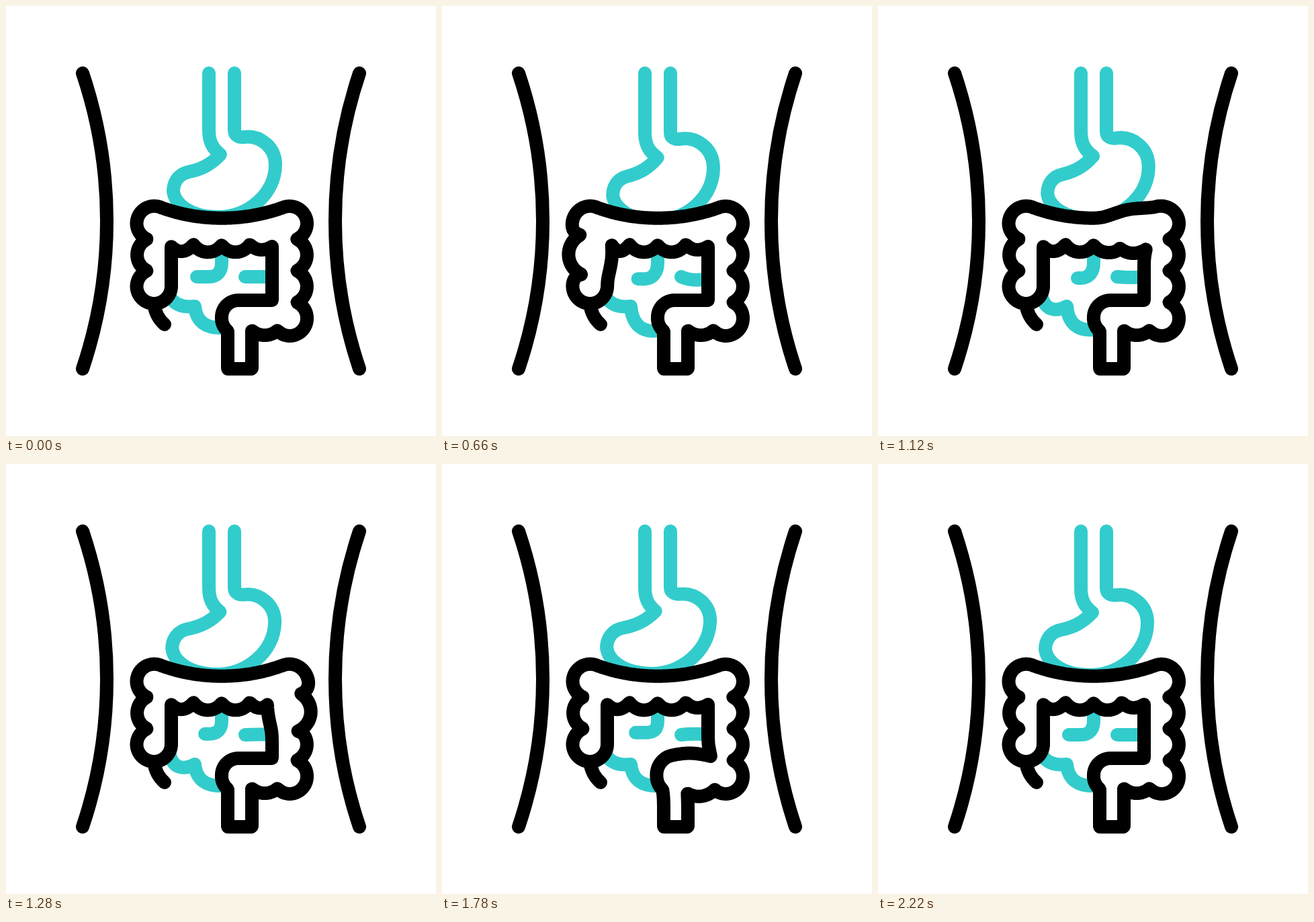
These frames come from a looping animation (640 by 640 pixels, 2.4 s). An HTML page:

```html
<!DOCTYPE html>
<html lang="en">
<head>
<meta charset="utf-8">
<title>Digestion</title>
<style>
  html, body { margin: 0; width: 100%; height: 100%; overflow: hidden; background: #fff; }
  svg { display: block; width: 100vw; height: 100vh; }
  path { fill: none; stroke: #000; stroke-width: 20; stroke-linecap: round; stroke-linejoin: round; }
  .teal path { stroke: #3cc; }
  #colon { fill: #fff; }
</style>
</head>
<body>
<svg viewBox="0 0 640 640">
  <path d="M114 100A690 690 0 0 1 114 540M526 100A690 690 0 0 0 526 540"/>
  <g class="teal">
    <path id="stomach"/>
    <path id="hook"/>
    <path id="bar"/>
    <path id="coil"/>
  </g>
  <path d="M220 443C222 458 228 467 236 474"/>
  <path id="colon" d="M231 300C288 321 354 321 412 300
    A26 26 0 0 1 448 324A26 26 0 0 1 433 347A26 26 0 0 1 433 394A26 26 0 0 1 433 441
    A26 26 0 0 1 448 465A26 26 0 0 1 422 491A26 26 0 0 1 404 483A29 29 0 0 1 366 483
    V540H330V484A25 25 0 0 1 321 463A25 25 0 0 1 346 438H396V358
    C386 364 374 366 363 355C352 370 332 370 321 356C310 370 290 370 279 355C268 368 256 368 246 358
    V417A26 26 0 0 1 221 443A26 26 0 0 1 194.5 417A26 26 0 0 1 210 394A26 26 0 0 1 210 347
    A26 26 0 0 1 194.5 324A26 26 0 0 1 231 300Z"/>
</svg>
<script>
const LOOP = 2400, STEP = 20, BEGIN = 220, END = 2220;
const { PI, sin, cos, min, max } = Math;
const el = id => document.getElementById(id);
const draw = (id, d) => el(id).setAttribute('d', d);
const clamp = (v, hi = 1) => max(0, min(hi, v));

const STOMACH = 'M302 100L302 185C302 204 309 213 319 221C305 236 291 243 272 247C257 250 249 262 249 276C251 292 270 314 316 314C360 314 401 280 401 236C401 210 378 192 355 195C347 196 340 193 340 185L340 100';

// Corners of the route the bulge takes through the colon, one leg each LEG ms
const ROUTE = [[221, 412], [222, 326], [420, 330], [425, 455], [325, 462]];
const LEG = 370, ENTER = 460, LEAVE = 1920;

const colon = el('colon');
const length = colon.getTotalLength();
const wall = Array.from({ length: 800 }, (_, i) => colon.getPointAtLength(length * i / 800));

function bulgeAt(t) {
  const legs = ROUTE.length - 1;
  const pos = clamp((t - ENTER) / LEG, legs);
  const i = min(Math.floor(pos), legs - 1);
  return ROUTE[i].map((v, axis) => v + (ROUTE[i + 1][axis] - v) * (pos - i));
}

// Pushes the wall away from the centre of the bulge
function drawColon(t) {
  const [px, py] = bulgeAt(t);
  const power = 8 * clamp(min((t - BEGIN) / 300, (LEAVE - t) / 140));
  const pts = wall.map(({ x, y }) => {
    const dx = x - px, dy = y - py, r = Math.hypot(dx, dy) || 1;
    const k = power * Math.exp(-((r / 42) ** 4)) / r;
    return (x + dx * k).toFixed(2) + ' ' + (y + dy * k).toFixed(2);
  });
  draw('colon', 'M' + pts.join('L') + 'Z');
}

// Swings the stomach below the gullet; it dips further than it rises
function drawStomach(wave) {
  const swing = wave * (0.82 + 0.18 * wave);
  const dip = swing * (0.7 + 0.3 * swing);
  draw('stomach', STOMACH.replace(/(\d+) (\d+)/g, (_, x, y) => {
    if (y < 150) return `${x} ${y}`;
    const nx = +x + 0.1 * max(0, y - 195) * swing;
    const ny = +y + 0.075 * (420 - x) * dip;
    return nx.toFixed(2) + ' ' + ny.toFixed(2);
  }));
}

function drawBowel(p, wave) {
  const x = 284 + 13 * sin(PI * p ** 0.85) ** 2;
  const y = 403 + 4.5 * wave;
  const bend = 10 * sin(2 * PI * p) * (1 - p);
  const low = 6 * max(0, wave);
  const high = 8 * max(0, -cos(2 * PI * p));
  draw('hook', `M321 365V382C321 396 314 ${y} 302 ${y}L${x} ${y}`);
  draw('bar', `M356 403Q372 ${403 + bend} 396 ${403 + bend * 0.35}`);
  draw('coil', `M243 430C248 ${444 + high} 262 ${449 + high} 281 447` +
    `C283 ${470 + low} 298 ${480 + low * 1.6} 322 ${479 + low}`);
}

function frame(now) {
  const t = Math.floor(now % LOOP / STEP) * STEP;
  const p = clamp((t - BEGIN) / (END - BEGIN));
  const wave = sin(2 * PI * p * p * (3 - 2 * p));
  drawStomach(wave);
  drawBowel(p, wave);
  drawColon(t);
}

const start = performance.now();
function tick() {
  frame(performance.now() - start);
  requestAnimationFrame(tick);
}
tick();
</script>
</body>
</html>
```
